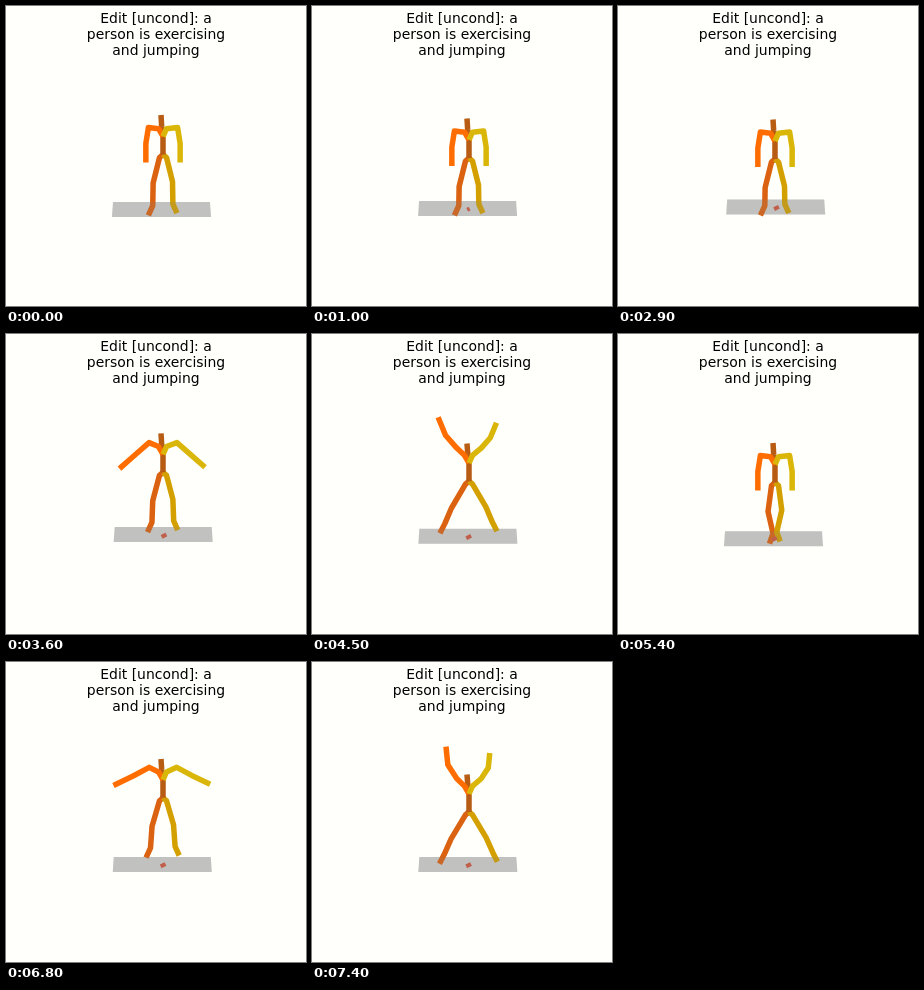
An HTML page with a canvas for the animation above (7.5 s loop, 300 by 300 pixels).

```html
<!DOCTYPE html>
<html lang="en">
<head>
<meta charset="utf-8">
<title>Exercising and jumping</title>
<style>
html, body { margin: 0; width: 100%; height: 100%; overflow: hidden; background: #fffffb; }
canvas, svg { position: absolute; left: 0; top: 0; width: 300px; height: 300px; }
text { font: 13.95px "DejaVu Sans", sans-serif; text-anchor: middle; fill: #000; }
</style>
</head>
<body>
<canvas id="stage" width="300" height="300"></canvas>
<svg viewBox="0 0 300 300">
  <text x="150" y="17">Edit [uncond]: a</text>
  <text x="150" y="33">person is exercising</text>
  <text x="150" y="49">and jumping</text>
</svg>
<script>
const ctx = document.getElementById('stage').getContext('2d');
const LOOP = 7500, STEP = 100;
const TAKEOFFS = [1430, 3630, 6780];
const LEFT = -1, RIGHT = 1;
const COLORS = { legL: '#da6210', legR: '#d3a000', spine: '#b85c14', armL: '#ff6d00', armR: '#dab608' };

function ease(t, from, to) {
  const u = Math.min(1, Math.max(0, (t - from) / (to - from)));
  return u * u * (3 - 2 * u);
}

function bump(t, center, width) {
  const u = Math.abs(t - center) / width;
  return u < 1 ? Math.cos(u * Math.PI / 2) ** 2 : 0;
}

// One jumping jack; p is the time since its takeoff.
const jack = {
  lift: p => ease(p, -300, 460) - ease(p, 780, 1380),
  spread: p => ease(p, -100, 420) - ease(p, 820, 1250),
  fold: p => bump(p, 700, 120),
  crouch: p => bump(p, -300, 350) + bump(p, 1420, 250),
  hop: p => 13 * bump(p, 40, 260) + 11 * bump(p, 1060, 250) - 4 * bump(p, 720, 170)
};

function bodyAt(t) {
  const body = { narrow: bump(t, 5300, 550) };
  for (const key in jack) body[key] = TAKEOFFS.reduce((sum, t0) => sum + jack[key](t - t0), 0);
  return body;
}

// Follows segments [length, degrees outward from straight down].
function chain([x, y], side, segments) {
  return segments.map(([len, deg]) => {
    const a = deg * Math.PI / 180;
    x += side * len * Math.sin(a);
    y += len * Math.cos(a);
    return [x, y];
  });
}

function arm([x, y], side, { lift, fold }) {
  const swing = Math.sin(Math.PI * lift);
  const away = side === RIGHT ? lift * 3.5 : 0;
  const collar = [x - 0.5 + side * 4, y - 7.8];
  const shoulder = [x + side * (14.6 - 2.3 * lift), y - 9 - 6.5 * lift - swing];
  const segments = [
    [16.3 + 2.2 * swing - away, 9 + 138 * lift],
    [19 + 3 * swing - away - 3 * fold, 168 * lift + 25 * fold]
  ];
  return [[x, y], collar, shoulder, ...chain(shoulder, side, segments)];
}

function leg([x, y], side, { spread, crouch, narrow }) {
  const hip = [x + side * 3.5, y + 3];
  const short = side === RIGHT ? 1.5 : 0;
  const segments = [
    [26.3 + 1.7 * spread - short, 14 + 17 * spread - 7 * narrow],
    [22.5 - 5 * crouch - 6 * spread, 1 + 23 * spread - 15 * narrow],
    [10.8 - short / 2, 24 + 3 * spread - 5 * narrow]
  ];
  return [[x, y], hip, ...chain(hip, side, segments)];
}

function path(pts) {
  ctx.beginPath();
  pts.forEach(([x, y]) => ctx.lineTo(x, y));
}

function line(pts, color, width = 5.5) {
  path(pts);
  ctx.strokeStyle = color;
  ctx.lineWidth = width;
  ctx.stroke();
}

function floor(x, y, alpha) {
  path([[107 + x, 196 + y], [204 + x, 196 + y], [205 + x, 211 + y], [106 + x, 211 + y]]);
  ctx.fillStyle = `rgba(128, 128, 128, ${alpha})`;
  ctx.fill();
}

function draw(t) {
  const body = bodyAt(t);
  const pelvis = [157, 148.5 + 5 * body.crouch - body.hop];
  const chest = [157, pelvis[1] - 18];
  const neck = [155.7, chest[1] - 10];
  const head = [155, chest[1] - 21.5 + 2 * body.lift];
  const fx = 2.2 * bump(t, 2900, 2200) + 0.8 * bump(t, 6900, 900);
  const fy = -ease(t, 0, 1000) - 2 * bump(t, 3400, 1600) + 2.2 * bump(t, 5400, 1100);

  ctx.fillStyle = '#fffffb';
  ctx.fillRect(0, 0, 300, 300);
  ctx.lineJoin = 'round';

  // the translucent floor lies partly over the feet
  floor(fx, fy, 0.37);
  line(leg(pelvis, LEFT, body), COLORS.legL);
  line(leg(pelvis, RIGHT, body), COLORS.legR);
  floor(fx, fy, 0.2);

  // short ground trail
  const r = 2.4 * ease(t, 0, 2000), tx = 156.3 + fx, ty = 204 + fy * 0.8;
  line([[tx - r, ty + r / 2], [tx + r, ty - r / 2]], '#c0604c', 4);

  line([head, neck, chest, pelvis], COLORS.spine);
  line(arm(chest, LEFT, body), COLORS.armL);
  line(arm(chest, RIGHT, body), COLORS.armR);
}

function tick(now) {
  draw(Math.floor((now % LOOP) / STEP) * STEP);
  requestAnimationFrame(tick);
}
draw(0);
requestAnimationFrame(tick);
</script>
</body>
</html>
```
